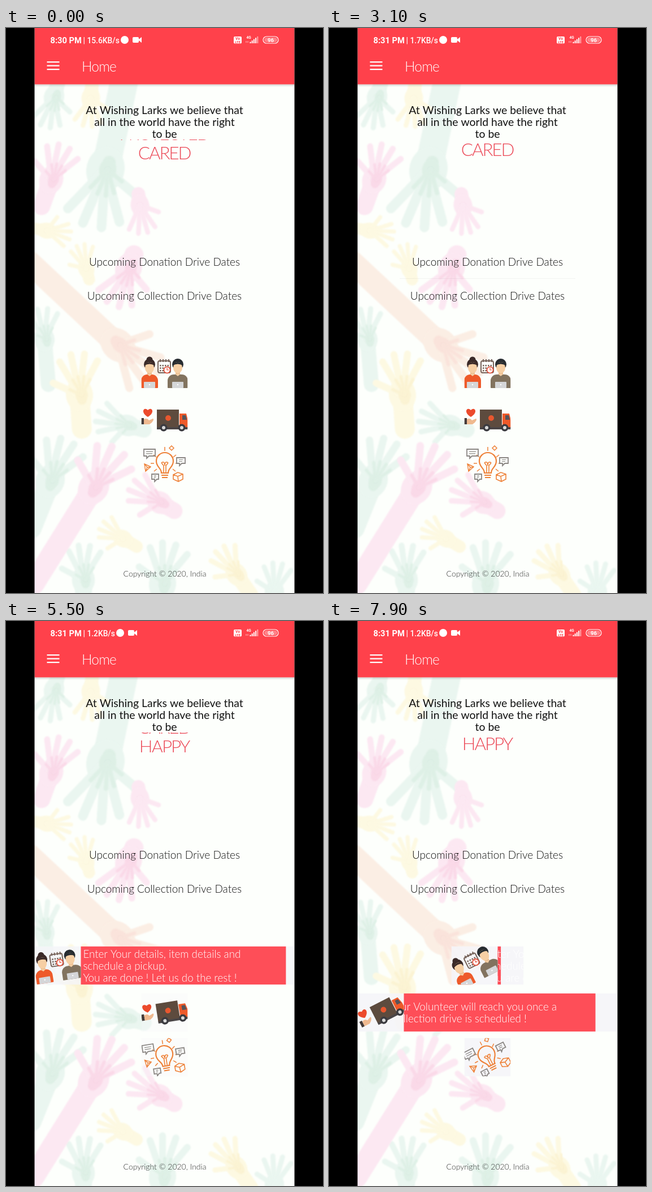
Write an HTML page with a canvas that moves like this. It is 561x998 px and loops after 8000 ms.

```html
<!DOCTYPE html>
<html lang="en">
<head>
<meta charset="utf-8">
<title>Home</title>
<style>
  html, body { margin: 0; width: 100%; height: 100%; overflow: hidden; background: #000; }
  canvas { display: block; width: 561px; height: 998px; }
</style>
</head>
<body>
<canvas id="stage" width="561" height="998"></canvas>
<script>
const W = 561, H = 998, LEFT = 50.5, RIGHT = 510.5, LOOP = 8000, STEP = 100;
const RED = '#ff414b', ORANGE = '#ee5a2a', BROWN = '#5d4b3e', SKIN = '#f6cfa4', GREY = '#8b8784';
let ctx = document.getElementById('stage').getContext('2d');

const clamp = v => Math.max(0, Math.min(1, v));
const ramp = (t, from, to) => clamp((t - from) / (to - from));
const easeOut = x => 1 - (1 - x) ** 2;
const easeInOut = x => x < .5 ? 2 * x * x : 1 - 2 * (1 - x) ** 2;
const rad = deg => deg * Math.PI / 180;

function rect(x, y, w, h, color, r = 0) {
  ctx.fillStyle = color;
  ctx.beginPath();
  ctx.roundRect(x, y, w, h, r);
  ctx.fill();
}
function frame(x, y, w, h, color, width, r = 0) {
  ctx.strokeStyle = color;
  ctx.lineWidth = width;
  ctx.beginPath();
  ctx.roundRect(x, y, w, h, r);
  ctx.stroke();
}
function oval(x, y, rx, ry, color) {
  ctx.fillStyle = color;
  ctx.beginPath();
  ctx.ellipse(x, y, rx, ry, 0, 0, 7);
  ctx.fill();
}
function path(d, stroke, width = 1.5, fill) {
  const p = new Path2D(d);
  ctx.lineWidth = width;
  if (fill) { ctx.fillStyle = fill; ctx.fill(p); }
  if (stroke) { ctx.strokeStyle = stroke; ctx.stroke(p); }
}
function text(str, x, y, size, color, { weight = 300, align = 'left', family = 'Lato', spacing = 0 } = {}) {
  ctx.font = `${weight} ${size}px ${family}, sans-serif`;
  ctx.letterSpacing = spacing + 'px';
  ctx.textAlign = align;
  ctx.fillStyle = color;
  ctx.fillText(str, x, y);
}
function clipped(x, y, w, h, draw) {
  ctx.save();
  ctx.beginPath();
  ctx.rect(x, y, w, h);
  ctx.clip();
  draw();
  ctx.restore();
}

// Backdrop of reaching hands: [x, y, direction, palm radius, arm length]
const HANDS = [
  { color: '#eaf6f0', shade: '#def0e6', list: [[85, 122, 195, 24, 40], [176, 250, 192, 45, 175], [68, 550, -5, 24, 80],
    [215, 702, -75, 25, 30], [78, 800, 22, 34, 90], [137, 975, 0, 27, 50], [277, 982, 8, 32, 40], [475, 997, 5, 23, 20]] },
  { color: '#fdf9e2', shade: '#fbf3d3', list: [[150, 124, 185, 22, 40], [72, 358, 100, 19, 30], [142, 425, -15, 19, 20],
    [130, 648, -4, 32, 60], [207, 902, -60, 20, 28], [408, 965, -35, 24, 45]] },
  { color: '#fce8f2', shade: '#fad9e8', list: [[80, 268, 20, 28, 50], [237, 313, 172, 22, 20], [217, 424, 202, 31, 25],
    [155, 812, 32, 35, 200], [272, 838, -60, 26, 30]] },
  { color: '#fbeee4', shade: '#fae3db', list: [[198, 560, 133, 37, 215]] }
];
function hand(x, y, deg, r, arm, color) {
  ctx.save();
  ctx.translate(x, y);
  ctx.rotate(rad(deg));
  ctx.fillStyle = ctx.strokeStyle = color;
  const limb = (angle, length, width) => {
    ctx.lineWidth = width;
    ctx.beginPath();
    ctx.moveTo(0, 0);
    ctx.lineTo(Math.sin(rad(angle)) * length, -Math.cos(rad(angle)) * length);
    ctx.stroke();
  };
  limb(180, arm, r * 1.1);
  ctx.beginPath();
  ctx.ellipse(0, 0, r * .75, r * .9, 0, 0, 7);
  ctx.fill();
  [-62, -27, -8, 11, 32].forEach((a, i) => limb(a, r * (i ? 2.35 - Math.abs(i - 2.5) * .15 : 1.6), r * .38));
  ctx.restore();
}
function paintBackdrop() {
  const layer = document.createElement('canvas');
  layer.width = W;
  layer.height = H;
  const screen = ctx;
  ctx = layer.getContext('2d');
  rect(0, 0, W, H, '#fdfffc');
  ctx.filter = 'blur(1px)';
  ctx.lineCap = 'round';
  for (const { color, shade, list } of HANDS) for (const [x, y, deg, r, arm] of list) {
    hand(x, y, deg, r, arm, color);
    if (r > 23) hand(x + 4, y, deg, r * .45, r * .3, shade);
  }
  ctx = screen;
  return layer;
}
const backdrop = paintBackdrop();

// Icons are drawn around their own centre
function person(x, hair, body, bun) {
  if (bun) oval(x, -22, 5.5, 5.5, hair);
  oval(x, -14, 10, 10, hair);
  rect(x - 4, -6, 8, 12, '#e9bd90');
  oval(x, -8, 8, 10, SKIN);
  path(`M${x - 9} -12Q${x} -24 ${x + 9} -12Q${x} -17 ${x - 9} -12`, null, 0, hair);
  const w = bun ? 15 : 18;
  rect(x - w, 4, 2 * w, 24, body, [11, 11, 1, 1]);
  path(`M${x - 5} 3L${x} 7L${x + 5} 3`, null, 0, SKIN);
  rect(x - 10, 17, 20, 11, '#d5d6d8', 1);
  oval(x, 22, 1.2, 1.2, '#fff');
}
function meetingIcon() {
  frame(-12, -20, 22, 21, '#76635a', 2, 3);
  for (let i = 0; i < 4; i++) rect(-9 + i * 5, -23, 2, 5, '#76635a');
  for (let i = 0; i < 12; i++) rect(-9 + i % 4 * 4.5, -13 + Math.floor(i / 4) * 4.5, 2.5, 2.5, '#76635a');
  person(-27, '#3b2a28', ORANGE, true);
  person(23, '#272c30', '#82735f', false);
  oval(4, -4, 6.5, 6.5, '#e2533e');
  oval(4, -4, 4.7, 4.7, '#fff');
  path('M4 -8V-4H7', '#e2533e', 1.2);
}
function truckIcon() {
  path('M-30 -4C-44 -12 -37 -23 -30 -16C-23 -23 -16 -12 -30 -4', null, 0, '#ec4a2c');
  rect(-42, -2, 5, 11, '#443b3a');
  path('M-37 0Q-31 -3 -28 2L-21 -1Q-18 0 -23 6L-27 9H-37Z', null, 0, '#efb990');
  rect(-14, -17, 39, 32, BROWN);
  oval(6, -2, 5, 5, '#e8572f');
  path('M26 -10H38L41 2V15H26Z', null, 0, ORANGE);
  path('M31 -7H37L39 1H31Z', null, 0, '#55545b');
  rect(-14, 14, 55, 4, '#4a4546');
  for (const x of [-2, 30]) {
    oval(x, 15, 6.5, 6.5, '#3b3b40');
    oval(x, 15, 3, 3, '#d8d8d8');
  }
}
function bubble(x, y, w, h) {
  path(`M${x} ${y}h${w}v${h}h${-w + 9}l-4 4v-4h-5z`, GREY, 1.8);
  path(`M${x + 4} ${y + h * .35}h${w - 8}M${x + 4} ${y + h * .65}h${w - 9}`, GREY, 1.2);
}
function ideaIcon() {
  const o = '#ee8138';
  path('M-6 16C-6 7 -15 6 -15 -5A15 15 0 0 1 15 -5C15 6 6 7 6 16Z', o, 2.2);
  path('M-2 15V3L-6 -2M2 15V3L6 -2M-6 -2Q0 -6 0 3Q0 -6 6 -2', o, 1.6);
  path('M-6 20H6M-5 24H5', o, 2);
  path('M0 -30V-23M-20 -16L-15 -12M20 -16L15 -12M-25 -1H-19M19 -1H25M-19 13L-14 9M19 13L14 9', o, 1.5);
  path('M12 -32L16 -28L12 -24L8 -28Z', o, 1.5);
  path('M-36 0L-25 5L-34 13ZM-36 0L-31 6L-34 13M-31 6H-25', o, 1.4);
  path('M23 15L32 18V27L24 31L15 27V19ZM15 19L23 22L32 18M23 22L24 31', o, 1.6);
  bubble(-37, -26, 20, 12);
  bubble(21, -11, 15, 10);
  bubble(-23, 18, 12, 9);
}

const ROWS = [
  { y: 574.5, icon: meetingIcon, lines: ['Enter Your details, item details and', 'schedule a pickup.', 'You are done ! Let us do the rest !'] },
  { y: 657.5, icon: truckIcon, lines: ['Our Volunteer will reach you once a', 'collection drive is scheduled !'] },
  { y: 736.5, icon: ideaIcon, lines: [] }
];

// spread: how far the row has widened; slide: how far its red panel has come in
function row({ y, icon, lines }, drop, spread, slide, tilt) {
  const top = y + drop, height = 68, iconW = 82;
  const width = iconW + 378 * spread, x = 280.5 - width / 2;
  const panelX = x + iconW, area = width - iconW, shift = (slide - 1) * area;
  const moving = spread < 1 || slide < 1;
  const haze = Math.max(Math.abs(tilt) / 30, moving ? .8 * spread : 0);
  clipped(x, top, width, height, () => {
    rect(x, top, width, height, `rgba(245,246,249,${haze})`);
    if (area > 0) clipped(panelX, top, area, height, () => {
      rect(panelX + shift, top, area, height, 'rgba(255,65,75,.92)');
      const first = lines.length === 3 ? 20 : 30.5;
      lines.forEach((line, i) => text(line, panelX + shift + 19, top + first + i * 21.3, 18.8, '#fff'));
    });
    clipped(x, top, iconW, height, () => {
      ctx.translate(x + iconW / 2 + .5, top + height / 2 - .5);
      ctx.rotate(rad(tilt));
      icon();
    });
  });
}

function slidingWords(t) {
  const words = ['CARED', 'HAPPY', 'PROTECTED'], period = 710, travel = 340;
  const clock = Math.max(t, 540) - 1667 + period * 3;
  const turn = Math.floor(clock / period);
  const pos = turn - 2 + clamp((clock - turn * period) / travel);
  clipped(LEFT, 197, RIGHT - LEFT, 35, () => {
    for (let i = Math.floor(pos); i <= Math.floor(pos) + 1; i++)
      text(words[(i + 3) % 3], 280, 227.5 + (i - pos) * 34, 31.5, '#ec4b59', { align: 'center', spacing: -2.2 });
  });
}

function dropdown(label, y, opened, active) {
  if (active) {
    const edge = Math.min(1, opened / 4);
    rect(125, y, 311, 60, `rgba(249,249,251,${.75 * edge})`, 3);
    rect(125, y + 60, 311, opened, 'rgba(252,252,252,.9)');
    rect(125, y + 59.5, 311, 1, `rgba(50,50,50,${.05 + .75 * edge})`);
    rect(126, y + 60 + opened, 309, 3, `rgba(0,0,0,${.12 * edge})`);
  }
  text(label, 280.5, y + 37.5, 19, '#111', { align: 'center' });
}

function header(t) {
  rect(LEFT, 99.5, RIGHT - LEFT, 2, 'rgba(0,0,0,.14)');
  rect(LEFT, 101.5, RIGHT - LEFT, 2, 'rgba(0,0,0,.05)');
  rect(LEFT, 0, RIGHT - LEFT, 99.5, RED);
  const white = '#fff', ui = { weight: 500, family: 'Roboto' };
  const speed = t < 900 ? '15.6' : t < 5000 ? '1.7' : '1.2';
  text(t < 2700 ? '8:30 PM' : '8:31 PM', 78.5, 26.5, 14.7, white, { ...ui, weight: 700 });
  text(`| ${speed}KB/s`, 136.5, 26.5, 13.8, white, ui);
  const x = t < 900 ? 210 : 202;
  oval(x, 21, 7, 7, white);
  rect(x + 14, 16, 11, 10, white, 2);
  path(`M${x + 25} 20L${x + 30} 16V26L${x + 25} 22Z`, null, 0, white);
  rect(403, 15, 14, 12.5, white, 2);
  const tiny = { ...ui, weight: 700, align: 'center' };
  text('Vo', 410, 21, 6.5, RED, tiny);
  text('LTE', 410, 26.6, 6, RED, tiny);
  text('4G', 429.5, 18.5, 6.5, white, tiny);
  path('M425 23V26M428 23V26', 'rgba(255,255,255,.7)', 1);
  for (let i = 0; i < 5; i++) rect(431.5 + i * 3.2, 24.5 - i * 2.4, 2, 2.5 + i * 2.4, i < 4 ? white : 'rgba(255,255,255,.55)');
  frame(455, 15, 27, 12, white, 1.2, 6);
  rect(457, 17, 23, 8, 'rgba(255,255,255,.35)', 4);
  text('96', 468.5, 24.6, 9.5, white, tiny);
  for (const y of [59, 65.5, 72]) rect(72.5, y, 22, 2.2, white);
  text('Home', 134, 76.5, 24.5, white, { spacing: -.8 });
}

function draw(t) {
  ctx.drawImage(backdrop, 0, 0);

  ['At Wishing Larks we believe that', 'all in the world have the right', 'to be'].forEach((line, i) =>
    text(line, 280.5, 151.5 + i * 21.3, 19.4, '#111', { weight: 400, align: 'center' }));
  slidingWords(t);

  const donation = 30 * Math.sin(Math.PI * ramp(t, 2300, 3100));
  const collection = 43 * Math.min(ramp(t, 3300, 3600), 1 - ramp(t, 3950, 4450));
  dropdown('Upcoming Donation Drive Dates', 382.5, donation, t >= 2300 && t <= 3100);
  dropdown('Upcoming Collection Drive Dates', 442 + donation, collection, collection > 0);

  const swing = start => Math.sin(Math.PI * ramp(t, start, start + 560));
  const tilt = -27 * (swing(5000) + swing(7620));
  const drop = donation + collection;
  const shut = 1 - easeInOut(ramp(t, 7350, 8080));
  row(ROWS[0], drop, easeOut(ramp(t, 4860, 5160)) * shut, easeOut(ramp(t, 4860, 5660)) * shut, tilt);
  row(ROWS[1], drop, easeOut(ramp(t, 7350, 7650)), easeOut(ramp(t, 7350, 8160)), tilt);
  row(ROWS[2], drop, 0, 0, tilt);

  text('Copyright © 2020, India', 281, 969, 14, '#333', { align: 'center' });
  header(t);
  rect(0, 0, LEFT, H, '#000');
  rect(RIGHT, 0, W - RIGHT, H, '#000');
}

function tick() {
  const t = performance.now() % LOOP;
  draw(Math.floor(t / STEP) * STEP);
  requestAnimationFrame(tick);
}
tick();
</script>
</body>
</html>
```
